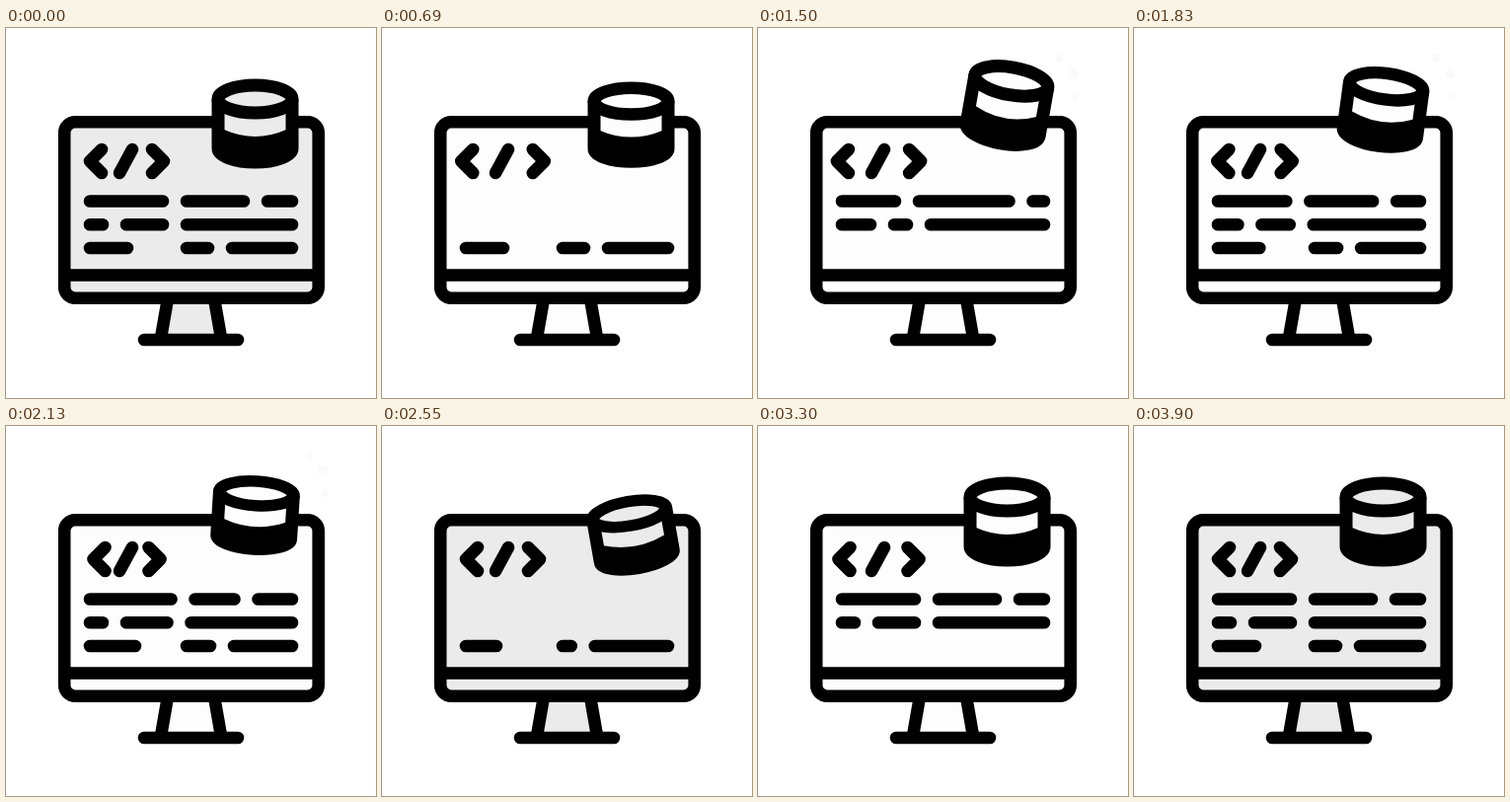
Animation, 375 px wide and 375 px high, one loop 4500 ms. Source, as an HTML page:

```html
<!DOCTYPE html>
<html lang="en">
<head>
<meta charset="utf-8">
<title>Code and database</title>
<style>
  html, body { margin: 0; width: 100%; height: 100%; overflow: hidden; background: #fff; }
  svg { display: block; width: 100vw; height: 100vh; }
  .line { fill: none; stroke: #000; stroke-width: 12.6; stroke-linecap: round; stroke-linejoin: round; }
  #disk .line { stroke-width: 13; stroke-linecap: butt; }
</style>
</head>
<body>
<svg viewBox="0 0 375 375">
  <g id="sparks" fill="#fafafa">
    <circle cx="305" cy="31" r="4"/>
    <circle cx="319" cy="47" r="5"/>
    <circle cx="321" cy="70" r="4"/>
  </g>

  <path class="tone" d="M163.5 277L157 314H218L211.5 277Z"/>
  <path class="line" d="M163.5 277L157 314M211.5 277L218 314M140 316H235"/>
  <rect class="tone line" x="59.2" y="95.3" width="257.5" height="178.5" rx="11"/>
  <path class="line" d="M60 250.5H316"/>

  <path class="line" id="left" d="M97 123L85 135L97 147"/>
  <path class="line" d="M128 123L115 147"/>
  <path class="line" id="right" d="M148 123L160 135L148 147"/>
  <path class="line row"/>
  <path class="line row"/>
  <path class="line row"/>

  <g id="disk">
    <path class="tone" d="M215 72V122A37.5 14 0 0 0 290 122V72Z"/>
    <path d="M215 100L221 103Q252.5 117 284 103L290 100V122A37.5 14 0 0 1 215 122Z"/>
    <path class="line" d="M215 72V122A37.5 14 0 0 0 290 122V72"/>
    <ellipse class="tone line" cx="252.5" cy="72" rx="37.5" ry="14"/>
  </g>
</svg>
<script>
const LOOP = 4500;
const $ = id => document.getElementById(id);
const tones = document.querySelectorAll('.tone');
const rows = document.querySelectorAll('.row');

// Eased 0 to 1 between two times
function ease(t, from, to) {
  const u = Math.min(1, Math.max(0, (t - from) / (to - from)));
  return u * u * (3 - 2 * u);
}

// Rises from a to b, holds until c, falls back by d
const swell = (t, a, b, c, d) => ease(t, a, b) - ease(t, c, d);

// Dash given by its outer ends, round caps included
const dash = (x1, x2, y) => `M${x1 + 6} ${y}H${x2 - 6}`;
const cutRow = (a, b, y) => dash(79, a - 6, y) + dash(a + 6, b - 6, y) + dash(b + 6, 296, y);

function drawScreen(t) {
  const light = swell(t, 330, 700, 700, 1140) + swell(t, 1140, 1480, 2130, 2550)
              + swell(t, 2550, 3300, 3300, 3900);
  const c = Math.round(235 + 18.5 * light - 5 * swell(t, 700, 1140, 1140, 1500));
  tones.forEach(el => el.style.fill = `rgb(${c},${c},${c})`);

  const spread = 9.5 * swell(t, 330, 1050, 1050, 2000) - 3.5 * swell(t, 1800, 2130, 2130, 2550)
               + 10 * swell(t, 2550, 2930, 2930, 3550);
  $('left').setAttribute('transform', `translate(${-spread} 0)`);
  $('right').setAttribute('transform', `translate(${spread} 0)`);
}

function drawRows(t, sink) {
  const apart = swell(t, 450, 950, 1500, 2130);
  const over = swell(t, 1500, 2130, 2130, 2850);
  const end = 129 + 8 * over - 10 * sink;
  const gap = 217 + 2 * over - 14 * sink;
  const paths = [
    cutRow(171 - 20 * apart + 8.5 * over, 253 + 13.5 * apart - 9.5 * over, 175.5),
    cutRow(110 + 16 * apart, 171 - 8 * apart + 4.5 * over, 199.2),
    dash(79, end, 223) + dash(177, gap - 6, 223) + dash(gap + 6, 296, 223)
  ];
  // Twice per loop the rows vanish one by one and return more slowly
  const since = t - (t < 2250 ? 420 : 2250);
  rows.forEach((row, i) => {
    row.setAttribute('d', paths[i]);
    const off = since >= 165 * i && since < 540 + 310 * i;
    row.setAttribute('visibility', off ? 'hidden' : 'visible');
  });
}

function drawDisk(t, sink) {
  const squat = swell(t, 450, 1140, 1140, 1400);
  const leap = swell(t, 1140, 1450, 1500, 2550);
  const y = 97 + 4 * squat - 18.5 * leap + 13.5 * sink;
  const scale = 1 - 0.14 * squat - 0.12 * swell(t, 1500, 2250, 2550, 3060);
  $('disk').setAttribute('transform',
    `translate(${252.5 + 2 * sink} ${y}) rotate(${10 * (leap - sink)}) ` +
    `scale(1 ${scale}) translate(-252.5 -97)`);

  const u = (t - 1440) / 900;
  $('sparks').setAttribute('visibility', u >= 0 && u < 1 ? 'visible' : 'hidden');
  $('sparks').setAttribute('transform', `translate(${3 * u} ${-2 * u})`);
}

function draw(t) {
  const sink = swell(t, 2130, 2550, 2550, 3060);
  drawScreen(t);
  drawRows(t, sink);
  drawDisk(t, sink);
}

const start = performance.now();
function tick() {
  draw((performance.now() - start) % LOOP);
  requestAnimationFrame(tick);
}
tick();
</script>
</body>
</html>
```
